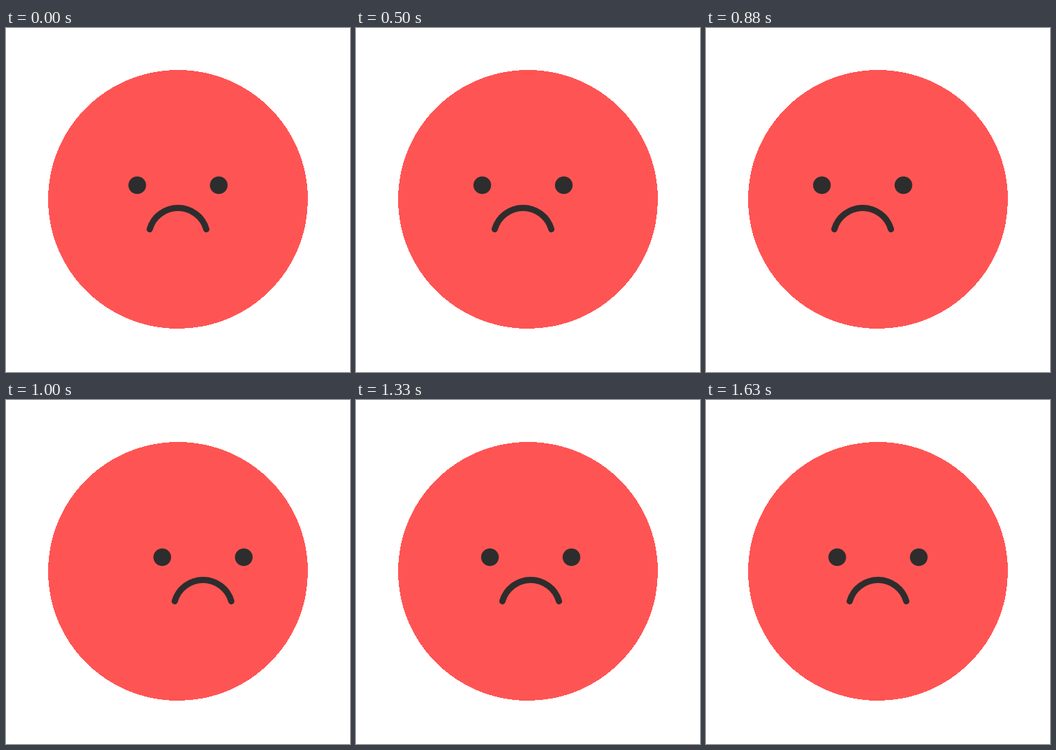
Write an HTML page that moves like this. It is 498x500 px and loops after 2 s.

```html
<!DOCTYPE html>
<html lang="en">
<head>
<meta charset="utf-8">
<title>Head shake</title>
<style>
  html, body { margin: 0; width: 100%; height: 100%; overflow: hidden; background: #fff; }
  svg { display: block; width: 498px; height: 500px; }
</style>
</head>
<body>
<svg viewBox="0 0 498 500">
  <circle cx="249" cy="249" r="188" fill="#ff5454" shape-rendering="crispEdges"/>
  <g id="face" fill="#2d2d2d">
    <circle cx="190" cy="228.5" r="12.8"/>
    <circle cx="308" cy="228.5" r="12.8"/>
    <path d="M208 292.5A42.6 42.6 0 0 1 290 292.5" fill="none" stroke="#2d2d2d" stroke-width="9" stroke-linecap="round"/>
  </g>
</svg>
<script>
  const face = document.getElementById('face');
  const LOOP = 2000, FPS = 24, SWING = 37.5;

  // Turning points of the shake: time in 1/24 s, side
  const keys = [
    [5, 0], [9.9, -1], [14.9, 1], [19.95, -1],
    [24.2, 1], [29.5, -1], [34.1, 1], [39, 0]
  ];

  // cubic-bezier(1/6, 0, 5/6, 1)
  function ease(x) {
    let lo = 0, hi = 1;
    for (let i = 0; i < 24; i++) {
      const t = (lo + hi) / 2;
      if (t * (0.5 + t * (1.5 - t)) < x) lo = t; else hi = t;
    }
    return lo * lo * (3 - 2 * lo);
  }

  function offset(step) {
    const i = keys.findIndex(([at]) => at > step);
    if (i < 1) return 0;
    const [t0, a] = keys[i - 1], [t1, b] = keys[i];
    return SWING * (a + (b - a) * ease((step - t0) / (t1 - t0)));
  }

  // Poses hold for 1/24 s, with changes on whole hundredths
  function draw(now) {
    const ms = Math.floor((now % LOOP) / 10) * 10;
    const step = Math.floor((ms + 4.9) * FPS / 1000);
    face.setAttribute('transform', `translate(${offset(step).toFixed(2)} 0)`);
  }

  let start;
  function tick(now) {
    start ??= now;
    draw(now - start);
    requestAnimationFrame(tick);
  }
  draw(0);
  requestAnimationFrame(tick);
</script>
</body>
</html>
```
